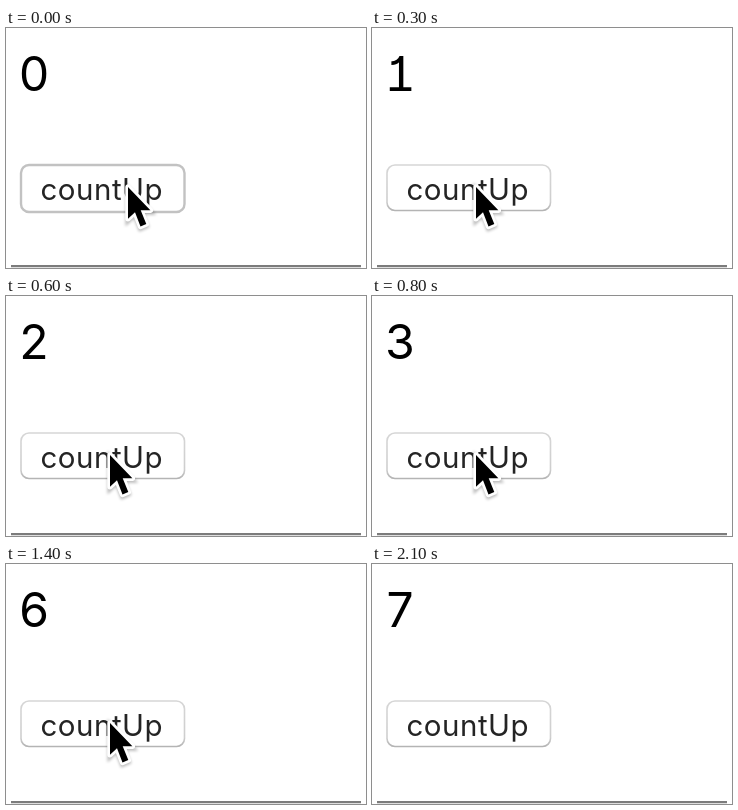
Recreate the animation shown at these times as an HTML page. Size 360x240 px, loop 2400 ms.

```html
<!DOCTYPE html>
<html lang="en">
<head>
<meta charset="utf-8">
<title>Count up</title>
<style>
  html, body { margin: 0; width: 100%; height: 100%; overflow: hidden; background: #fff; }
  svg { display: block; width: 360px; height: 240px; }
  text { font-family: Inter, "Liberation Sans", sans-serif; }
  #count { font-size: 48px; font-weight: 370; font-feature-settings: "tnum", "cv01"; fill: #000; }
  #label { font-size: 29.5px; font-weight: 430; letter-spacing: .5px; fill: #242424; }
  #button { fill: #fff; stroke: url(#rim); stroke-width: 1.6px; }
  #button.focus { height: 47px; stroke: #c2c2c2; stroke-width: 2.4px; }
  #button.down { fill: url(#blue); stroke: url(#blue); }
</style>
</head>
<body>
<svg viewBox="0 0 360 240">
  <defs>
    <linearGradient id="blue" x2="0" y2="1">
      <stop stop-color="#3d84fa"/>
      <stop offset="1" stop-color="#1048e0"/>
    </linearGradient>
    <linearGradient id="rim" x2="0" y2="1">
      <stop stop-color="#d6d6d6"/>
      <stop offset=".8" stop-color="#cecece"/>
      <stop offset="1" stop-color="#b4b4b4"/>
    </linearGradient>
    <filter id="soft" x="-50%" y="-50%" width="200%" height="200%">
      <feGaussianBlur stdDeviation="1.5"/>
    </filter>
    <path id="arrow" d="M0 0V31.8L7 25.2L12.5 39.4L18.3 37L12.7 23.2H22.4Z"/>
  </defs>
  <text id="count" x="12.5" y="63.2">0</text>
  <rect id="button" x="15" y="137" width="163.5" height="45.5" rx="8"/>
  <text id="label" x="34.5" y="172">countUp</text>
  <path d="M5 238.1H355" stroke="#7c7c7c" stroke-width="2.2"/>
  <g id="cursor">
    <use href="#arrow" y="2" stroke="#000" stroke-width="5" opacity=".28" filter="url(#soft)"/>
    <use href="#arrow" stroke="#fff" stroke-width="5.4" stroke-linejoin="round"/>
    <use href="#arrow"/>
  </g>
</svg>
<script>
  const LOOP = 2400;
  const counts = [[0, 0], [300, 1], [600, 2], [800, 3], [1000, 4], [1200, 5], [1400, 6], [1700, 7]];
  const looks = [[0, "focus"], [100, ""], [500, "down"], [600, ""]];
  const places = [[0, [122, 159]], [100, [108, 159]], [200, [104, 159]],
                  [1900, [165, 178]], [2000, [327, 214]], [2100, null]];

  const el = id => document.getElementById(id);
  const count = el("count"), button = el("button"), cursor = el("cursor");
  const at = (steps, t) => steps.findLast(([start]) => start <= t)[1];

  function draw(t) {
    const place = at(places, t);
    count.textContent = at(counts, t);
    button.setAttribute("class", at(looks, t));
    cursor.setAttribute("visibility", place ? "visible" : "hidden");
    if (place) cursor.setAttribute("transform", `translate(${place})`);
  }

  const start = performance.now();
  function tick() {
    draw((performance.now() - start) % LOOP);
    requestAnimationFrame(tick);
  }
  tick();
</script>
</body>
</html>
```
